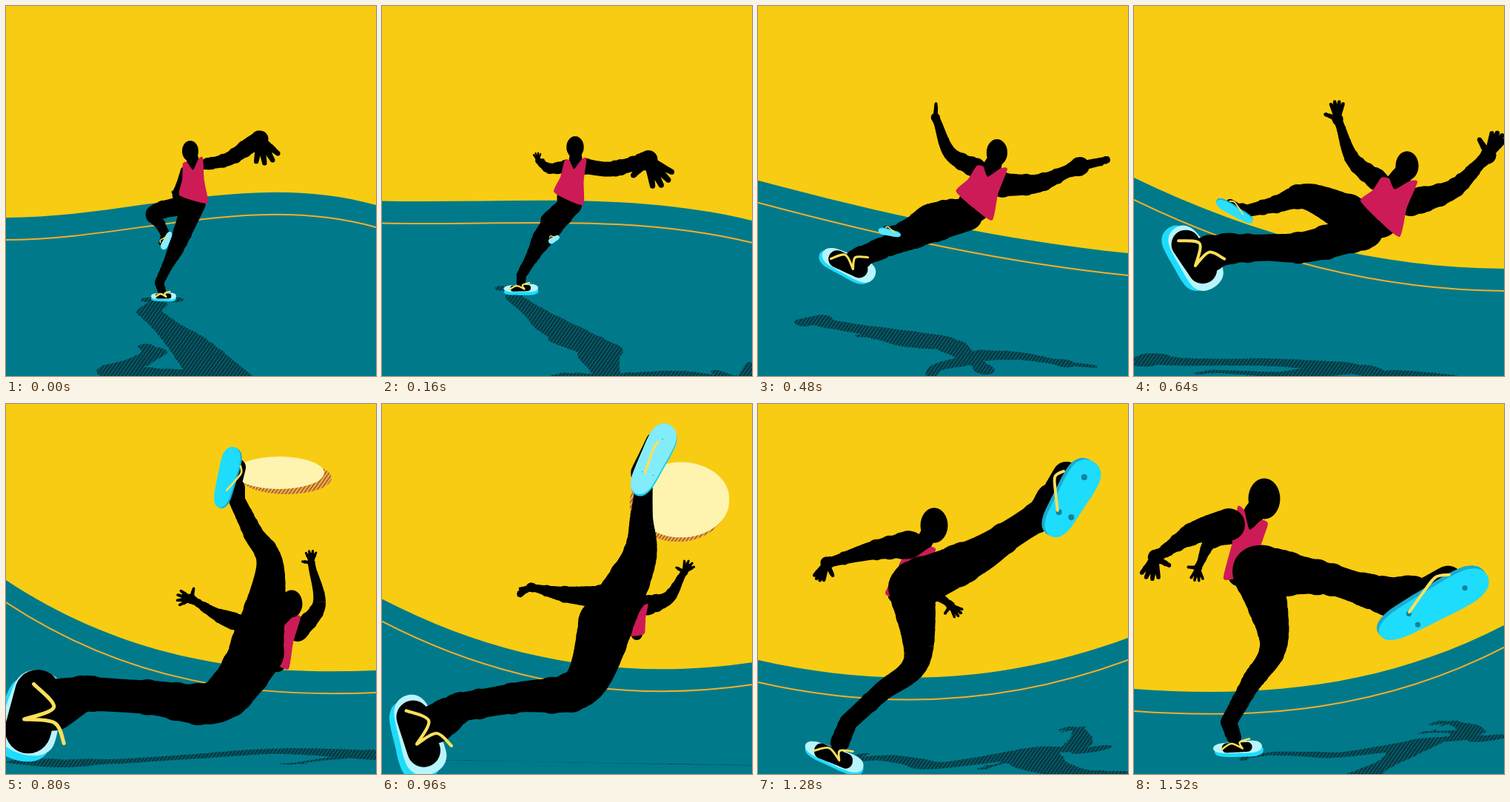
Write an HTML page that moves like this. It is 500x500 px and loops after 1.56 s.

```html
<!DOCTYPE html>
<html lang="en">
<head>
<meta charset="utf-8">
<title>Beach kick</title>
<style>
html, body { margin: 0; width: 100%; height: 100%; overflow: hidden; background: #f8cc12; }
svg { display: block; width: 100vw; height: 100vh; }
</style>
</head>
<body>
<svg id="stage" viewBox="0 0 500 500">
  <defs>
    <pattern id="hatch" width="4" height="4" patternUnits="userSpaceOnUse" patternTransform="rotate(125)">
      <rect width="4" height="4" fill="#00616f"/><rect width="4" height="2.2" fill="#0a323b"/>
    </pattern>
    <pattern id="rust" width="4" height="4" patternUnits="userSpaceOnUse" patternTransform="rotate(125)">
      <rect width="4" height="4" fill="#f3b245"/><rect width="4" height="1.9" fill="#a9602b"/>
    </pattern>
    <clipPath id="cast"><path id="castShape"/></clipPath>
  </defs>
</svg>
<script>
const LOOP = 1560, STEP = 40;
const TIMES = [0, 320, 640, 800, 1080, 1280, 1520];
const svg = document.getElementById('stage');
const castShape = document.getElementById('castShape');

// A track turns a few key poses into a smooth function of time.
function track(times, ...keys) {
  const v = keys.map(k => k.split(/[ ,]+/).map(Number));
  const last = times.length - 1;
  const slope = (i, j) => {
    const a = Math.max(0, i - 1), b = Math.min(last, i + 1);
    return 0.8 * (v[b][j] - v[a][j]) / (times[b] - times[a]);
  };
  return t => {
    let i = 0;
    while (i < last - 1 && t >= times[i + 1]) i++;
    const d = times[i + 1] - times[i];
    const u = Math.min(1, Math.max(0, (t - times[i]) / d)), u2 = u * u, u3 = u2 * u;
    return v[i].map((a, j) =>
      (2 * u3 - 3 * u2 + 1) * a + (3 * u2 - 2 * u3) * v[i + 1][j] +
      d * ((u3 - 2 * u2 + u) * slope(i, j) + (u3 - u2) * slope(i + 1, j)));
  };
}
const pose = (...keys) => track(TIMES, ...keys);

// Geometry helpers
const fix = n => n.toFixed(1);
const lerp = (a, b, u) => a.map((n, i) => n + (b[i] - n) * u);
const dist = (a, b) => Math.hypot(b[0] - a[0], b[1] - a[1]);
const polar = (deg, r) => [Math.cos(deg * Math.PI / 180) * r, Math.sin(deg * Math.PI / 180) * r];
const plus = (a, b) => [a[0] + b[0], a[1] + b[1]];
const group = (a, n) => Array.from({ length: Math.floor(a.length / n) }, (_, i) => a.slice(i * n, i * n + n));
const tint = (a, b, u) => `rgb(${lerp(a, b, Math.min(1, Math.max(0, u))).map(Math.round)})`;

function curve(pts, closed, k = 1 / 6) {
  const n = pts.length;
  const at = i => closed ? pts[(i + n) % n] : pts[Math.min(n - 1, Math.max(0, i))];
  let d = 'M' + pts[0].map(fix);
  for (let i = 0; i < (closed ? n : n - 1); i++) {
    const [a, b, c, e] = [at(i - 1), at(i), at(i + 1), at(i + 2)];
    d += 'C' + [b[0] + (c[0] - a[0]) * k, b[1] + (c[1] - a[1]) * k,
      c[0] - (e[0] - b[0]) * k, c[1] - (e[1] - b[1]) * k, c[0], c[1]].map(fix);
  }
  return closed ? d + 'Z' : d;
}

function oval(x, y, rx, ry = rx) {
  const arc = w => `a${fix(rx)} ${fix(ry)} 0 1 0 ${fix(w)} 0`;
  return `M${fix(x - rx)} ${fix(y)}${arc(2 * rx)}${arc(-2 * rx)}Z`;
}

// A limb is a smooth tube through [x, y, radius] joints.
function limb(joints) {
  const cuts = 10, n = joints.length;
  const at = i => joints[Math.min(n - 1, Math.max(0, i))];
  let d = '', prev;
  for (let k = 0; k <= (n - 1) * cuts; k++) {
    const i = Math.min(n - 2, Math.floor(k / cuts)), u = k / cuts - i;
    const [x, y, size] = [0, 1, 2].map(c => {
      const [a, b, e, f] = [at(i - 1)[c], at(i)[c], at(i + 1)[c], at(i + 2)[c]];
      return b + u * ((e - a) / 2 + u * (a - 2.5 * b + 2 * e - f / 2 + u * (1.5 * (b - e) + (f - a) / 2)));
    });
    const r = Math.max(0.5, size);
    d += oval(x, y, r);
    if (prev) {
      const [px, py, pr] = prev, len = Math.hypot(x - px, y - py) || 1;
      const nx = (py - y) / len, ny = (x - px) / len;
      d += `M${fix(px + nx * pr)} ${fix(py + ny * pr)}L${fix(x + nx * r)} ${fix(y + ny * r)}` +
        `L${fix(x - nx * r)} ${fix(y - ny * r)}L${fix(px - nx * pr)} ${fix(py - ny * pr)}Z`;
    }
    prev = [x, y, r];
  }
  return d;
}

// Horizon: heights of the four control points of one curve
const horizon = pose('286 286 222 269', '244 257 279 311', '232 313 354 355', '238 348 367 360',
  '287 352 377 339', '346 384 378 316', '385 397 385 299');
// Cast shadow: foot point on the ground, then the 2x2 projection of the body
const cast = pose('212 397 2.68 .22 0 -.87', '140 378 1.1 -.15 0 -.6', '20 478 1.1 -.2 0 -.25', '60 485 1.2 -.5 -.07 -.1',
  '100 478 .6 -.9 .1 .05', '125 480 -.29 -1.17 .25 .15', '150 478 -.2 -1 .2 .1');
// Ball: centre, radii, shade offset
const ballAt = track([680, 800, 1080, 1200], '560 78 50 18 10 6', '369 93 61 22 10 7', '466 159 70 71 -15 5', '600 200 95 96 -18 6');

// Legs: hip, knee, ankle as x, y, radius
const legA = pose('254,266,16 232,322,11 207,374,6', '260,270,16 214,299,17 169,353,8', '312,303,25 235,325,21 125,328,20',
  '340,335,36 285,402,29 105,391,23', '268,268,36 250,360,25 110,418,16', '208,248,32 215,345,18 122,430,12', '168,228,34 189,322,19 128,430,11');
const legB = pose('250,268,14 200,279,10 216,310,6', '256,275,12 240,292,6 235,307,3', '305,290,29 236,258,18 152,277,8',
  '338,335,37 357,222,19 312,130,11', '268,265,36 325,206,27 371,95,12', '212,244,33 293,207,25 385,148,20', '168,226,35 255,235,22 350,262,26');
// Arms: shoulder x, y, radius; elbow x, y; wrist x, y, radius; hand size, angle, finger spread
const armR = pose('268,214,7 300,207 330,188,11 11.5,70,20', '290,223,13 325,233 362,231,9 14,32,14', '374,266,18 430,248 468,212,8 11,-62,-13',
  '394,308,13 423,272 414,222,5 5.5,-92,-18', '318,242,13 350,253 388,243,5 6,-25,-18', '215,220,12 236,252 254,267,5 6,45,18', '135,175,14 104,186 90,214,5 6,95,20');
const armL = pose('241,222,5 236,238 230,254,5 3,260,15', '262,214,11 226,205 209,176,5 4.5,265,20', '330,236,14 296,208 279,163,6 8,268,-15',
  '318,297,12 286,285 258,268,5 6.5,185,22', '278,227,18 215,228 172,226,6 7,130,-10', '206,190,18 155,198 104,212,7 8.5,117,-12', '128,163,22 82,174 40,200,8 10,105,-17');
// Shirt: left shoulder, right shoulder, right hem, left hem
const shirt = pose('239,213 266,205 273,266 234,255', '260,208 293,210 279,274 237,249', '334,232 383,238 359,312 306,263', '356,280 398,288 382,358 350,340',
  '304,262 323,249 321,272 304,284', '208,176 240,198 200,262 172,255', '140,139 181,162 165,225 121,236');
const head = pose('249 196 11', '279 189 12.5', '369 216 15.5', '386 270 14.5', '309 196 13', '238 164 18.5', '176 128 21.5');
// Sandals: centre, half length, half width, toe angle, edge offset; the second adds lightness and foot side
const sandalA = pose('213 392 17 5 0 0 3', '160 370 30 8 2 0 5', '82 340 48 27 56 -9 0', '36 417 58 43 105 -8 8',
  '67 462 52 21 43 -5 5', '103 476 42 13 22 0 4', '140 464 33 9 -3 2 5');
const sandalB = pose('217 317 13 5 115 0 0 .7 1', '236 311 6 3.5 180 0 0 .7 1', '136 278 28 7 210 0 -2 .1 1', '298 99 42 14 284 2 1 0 .8',
  '400 79 57 24 298 -1 3 1 -.8', '424 128 58 24 300 -4 -2 0 -.9', '405 272 83 25 331 -3 -4 0 -.8');

function leg(v) {
  const [hip, knee, ankle] = group(v, 3);
  const calf = lerp(knee, ankle, 0.52);
  calf[2] *= 0.88;
  return limb([hip, knee, calf, ankle]);
}

function arm(v) {
  const [sx, sy, sr, ex, ey, wx, wy, wr, size, angle, spread] = v;
  const reach = 1.4 * size / (Math.hypot(wx - ex, wy - ey) || 1);
  const palm = [wx + (wx - ex) * reach, wy + (wy - ey) * reach];
  const finger = (deg, length) => limb([[...palm, size * 0.5], [...plus(palm, polar(deg, length * size)), size * 0.28]]);
  let d = limb([[sx, sy, sr], [ex, ey, (sr + wr) / 2], [wx, wy, wr], [...palm, size * 0.95]]);
  for (let i = -1.5; i < 2; i++) d += finger(angle + i * spread, 3 - 0.2 * Math.abs(i));
  return d + finger(angle + 4.5 * spread, 2.2);
}

// Places points given in sole units: along the toe axis and across it.
const sole = ([x, y, length, width, angle]) => (u, v) =>
  plus(plus([x, y], polar(angle, u * length)), polar(angle + 90, v * width));

function outline(place) {
  return Array.from({ length: 16 }, (_, i) => {
    const c = Math.cos(i * Math.PI / 8), s = Math.sin(i * Math.PI / 8);
    return place(c, s * (0.86 + 0.5 * c * c + 0.15 * c));
  });
}

function foot(ankle, place, width, side, size) {
  const heel = place(-0.45, side), toe = place(0.4, side);
  const step = lerp(ankle, [...place(0, side), width], 0.6);
  return limb([ankle, step]) + limb([[...heel, width * size], [...toe, width * size]]);
}

function cloth(v) {
  const [l, r, hr, hl] = group(v, 2);
  const mid = lerp(l, r, 0.5), hem = lerp(hl, hr, 0.5), core = lerp(mid, hem, 0.5);
  const side = (a, b) => lerp(lerp(a, b, 0.5), core, 0.1);
  const d = curve([l, lerp(l, r, 0.22), lerp(mid, hem, 0.24), lerp(l, r, 0.78), r,
    side(r, hr), hr, lerp(hem, core, -0.1), hl, side(l, hl)], true, 0.1);
  const wide = dist(l, r);
  return { d, spine: [[...hem, dist(hl, hr) * 0.36], [...core, wide * 0.38], [...mid, wide * 0.3]] };
}

function set(e, attrs) { for (const k in attrs) e.setAttribute(k, attrs[k]); }
function add(name, attrs) {
  const e = document.createElementNS('http://www.w3.org/2000/svg', name);
  set(e, attrs);
  return svg.appendChild(e);
}
const shape = fill => add('path', { fill });
const cord = stroke => add('path', { fill: 'none', stroke, 'stroke-width': 2, 'stroke-linecap': 'round', 'stroke-linejoin': 'round' });

const TEAL = '#007a8a', PINK = '#cc1b57', STRAP = '#fce05a';
const CYAN = [30, 220, 252], PALE = [184, 244, 251], DEEP = [24, 172, 206];
add('rect', { width: 500, height: 500, fill: '#f8cc12' });
const ground = shape(TEAL), lane = cord('#f5ae2d');
add('rect', { width: 500, height: 500, fill: 'url(#hatch)', 'clip-path': 'url(#cast)' });
const ballShade = shape('url(#rust)'), ball = shape('#fef4b0');
const rimA = shape(tint(CYAN, CYAN, 0)), padA = shape(tint(PALE, PALE, 0));
const back = shape('#000'), shirtBack = shape(PINK), front = shape('#000'), shirtFront = shape(PINK), skull = shape('#000');
const laceA = cord(STRAP), rimB = shape(''), padB = shape(''), studs = shape('#15829b'), laceB = cord(STRAP);

function draw(t) {
  const [a, b, c, e] = horizon(t);
  const land = drop => `M0 ${fix(a + drop)}C167 ${fix(b + drop)} 333 ${fix(c + drop)} 500 ${fix(e + drop)}`;
  set(ground, { d: land(0) + 'V500H0Z' });
  set(lane, { d: land(30) });

  const [bx, by, rx, ry, sx, sy] = ballAt(t);
  const inAir = t > 680 && t < 1200;
  set(ball, { d: inAir ? oval(bx, by, rx, ry) : '' });
  set(ballShade, { d: inAir ? oval(bx + sx, by + sy, rx, ry) : '' });

  const sa = sandalA(t), sb = sandalB(t), placeA = sole(sa), placeB = sole(sb);
  const edgeA = sa.slice(5), edgeB = sb.slice(5, 7), [light, side] = sb.slice(7);
  const la = legA(t), lb = legB(t), top = cloth(shirt(t)), [hx, hy, hr] = head(t);

  const behind = limb([...top.spine, [hx, hy, hr * 0.55]]) + arm(armR(t));
  const ahead = leg(la) + leg(lb) + arm(armL(t)) +
    foot(la.slice(6), placeA, sa[3], 0, 0.72) + foot(lb.slice(6), placeB, sb[3], side, 0.8);
  const face = oval(hx, hy, hr, hr * 1.28);
  set(back, { d: behind });
  set(front, { d: ahead });
  set(skull, { d: face });
  const over = t < 700;
  set(shirtFront, { d: over ? top.d : '' });
  set(shirtBack, { d: over ? '' : top.d });

  const [px, py, m11, m12, m21, m22] = cast(t);
  set(castShape, {
    d: behind + ahead + face,
    transform: `translate(${fix(px)} ${fix(py)}) matrix(${[m11, m21, m12, m22].map(n => n.toFixed(3))},0,0) translate(${fix(-sa[0])} ${fix(-sa[1])})`
  });

  const solesA = outline(placeA), solesB = outline(placeB);
  set(rimA, { d: curve(solesA.map(p => plus(p, edgeA)), true) });
  set(padA, { d: curve(solesA, true) });
  set(laceA, {
    d: curve([placeA(-0.65, 0.2), placeA(-0.25, -0.6), placeA(0.2, 0.2)]) +
      curve([placeA(0.2, 0.2), placeA(0.1, -0.75), placeA(0.5, -1.2)]),
    'stroke-width': fix(2 + sa[3] * 0.07)
  });
  set(rimB, { d: curve(solesB.map(p => plus(p, edgeB)), true), fill: tint(DEEP, CYAN, light) });
  set(padB, { d: curve(solesB, true), fill: tint(CYAN, PALE, light) });
  const dot = Math.max(0, -side) * 4.5;
  set(studs, { d: dot ? [[0.58, 0], [-0.42, -0.25], [-0.38, 0.5]].map(p => oval(...placeB(...p), dot)).join('') : '' });
  set(laceB, {
    d: curve([[-0.4, 0.4], [-0.05, 1.1], [0.25, 1.6], [0.46, 1.3]].map(([u, v]) => placeB(u, v * side))),
    'stroke-width': fix(1 + sb[3] * 0.12)
  });
}

const start = performance.now();
function tick() {
  const ms = (performance.now() - start) % LOOP;
  draw(Math.floor(ms / STEP) * STEP);
  requestAnimationFrame(tick);
}
tick();
</script>
</body>
</html>
```
